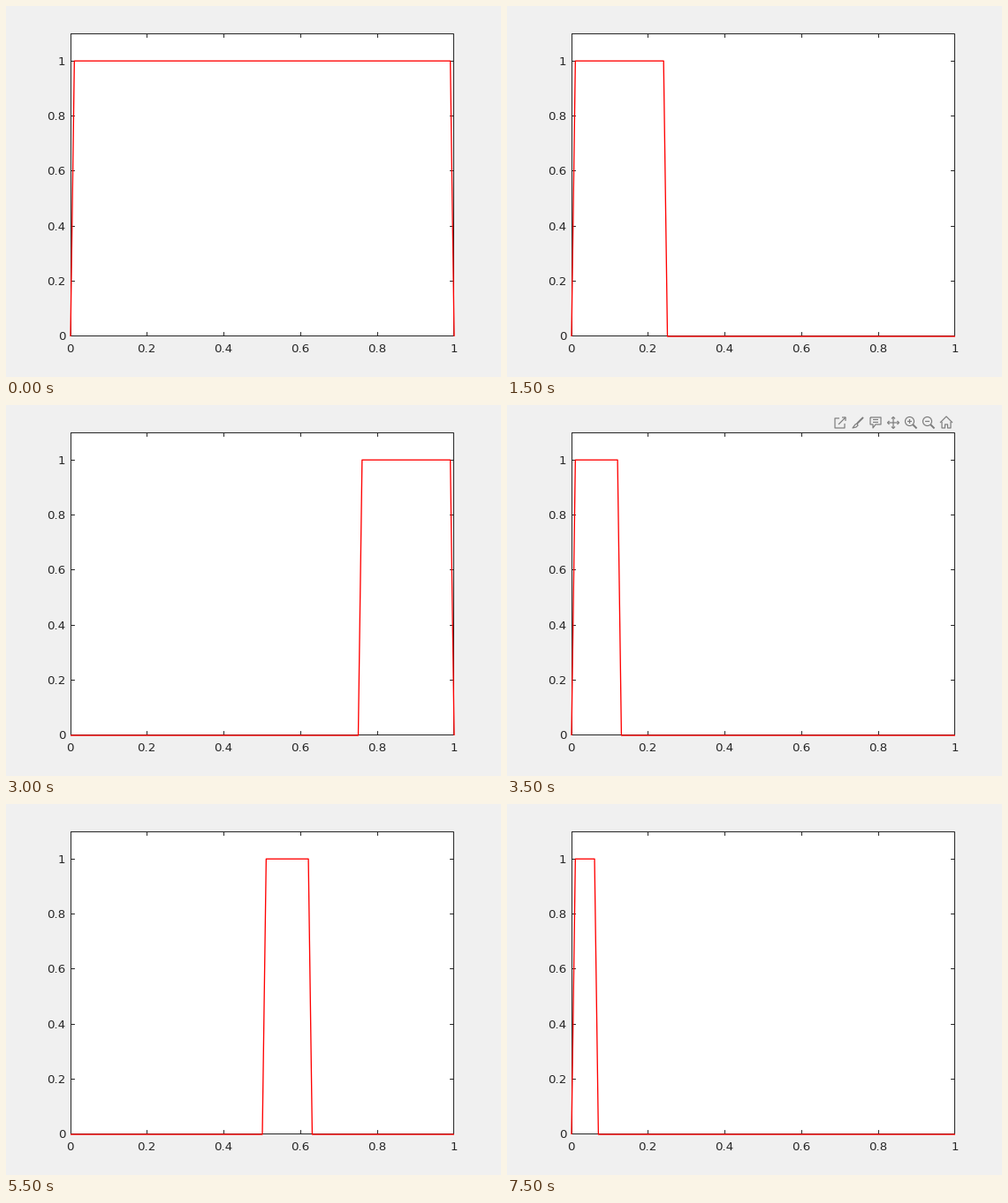
These frames come from a looping animation (560 px wide and 420 px high, 8000 ms). A matplotlib script:

```python
import numpy as np
import matplotlib.pyplot as plt
from matplotlib.animation import FuncAnimation
from matplotlib.patches import Circle, Rectangle

W, H, DPI = 560, 420, 100
PX = 72 / DPI  # points per pixel
LEFT, RIGHT, TOP, BOTTOM = 73, 507, 31, 374
Y_MAX = 1.1
INK, RED, ICON = "#262626", "#ff0000", "#7d7d7d"
TICK = 4.4

plt.rcParams["font.family"] = "DejaVu Sans"
fig = plt.figure(figsize=(W / DPI, H / DPI), dpi=DPI, facecolor="#f0f0f0")
ax = fig.add_axes([0, 0, 1, 1])
ax.set_xlim(0, W)
ax.set_ylim(H, 0)
ax.axis("off")


def px(x):
    return LEFT + x * (RIGHT - LEFT)


def py(y):
    return BOTTOM - y * (BOTTOM - TOP) / Y_MAX


def mid(p, edge):
    """Centre of the pixel that holds p, kept inside the plot box."""
    return min(np.floor(p + 1e-6), edge - 1) + 0.5


def stroke(xs, ys, color=INK, width=1.0, **kw):
    kw.setdefault("solid_capstyle", "butt")
    return ax.plot(xs, ys, color=color, lw=width * PX, snap=False, **kw)[0]


def label(x, y, text, align):
    ax.text(x, y, text, fontsize=13.33 * PX, color=INK, ha=align, va="baseline")


def draw_axes():
    ax.add_patch(Rectangle((LEFT, TOP), RIGHT - LEFT, BOTTOM - TOP,
                           fc="white", ec="none", snap=False, zorder=0))
    l, r, t, b = LEFT + 0.5, RIGHT - 0.5, TOP + 0.5, BOTTOM - 0.5
    stroke([l, r, r, l, l], [t, t, b, b, t], solid_joinstyle="miter",
           solid_capstyle="projecting")
    for v in np.arange(6) / 5:
        x, y = mid(px(v), RIGHT), mid(py(v), BOTTOM)
        name = f"{v:g}"
        label(px(v) - 0.5, 392, name, "center")
        label(67.5, y + 4.5, name, "right")
        if 0 < v < 1:
            stroke([x, x], [b, b - TICK])
            stroke([x, x], [t, t + TICK])
        if v > 0:
            stroke([l, l + TICK], [y, y])
            stroke([r, r - TICK], [y, y])


def draw_toolbar():
    """Small hover buttons above the plot, right to left."""
    cy, step = 20, 20
    home, out, into, pan, tip, brush, export = (497 - step * i for i in range(7))
    parts = []

    def line(cx, xs, ys, width=1.2):
        parts.append(stroke(cx + np.array(xs), cy + np.array(ys), ICON, width))

    def shape(patch):
        parts.append(ax.add_patch(patch))

    line(home, [-7, 0, 7], [0, -7, 0])
    line(home, [-5, -5, -1.5, -1.5, 1.5, 1.5, 5, 5], [-1, 6, 6, 2, 2, 6, 6, -1])
    for cx in (out, into):
        shape(Circle((cx - 1.5, cy - 1.5), 5, fc="none", ec=ICON, lw=1.2 * PX))
        line(cx, [2.2, 6.5], [2.2, 6.5], 2)
        line(cx, [-4, 1], [-1.5, -1.5])
    line(into, [-1.5, -1.5], [-4, 1])
    line(pan, [-6, 6], [0, 0])
    line(pan, [0, 0], [-6, 6])
    for s in (-1, 1):
        line(pan, [-2, 0, 2], [4.5 * s, 6.5 * s, 4.5 * s])
        line(pan, [4.5 * s, 6.5 * s, 4.5 * s], [-2, 0, 2])
    line(tip, [-6, 6, 6, 0, -3, -3, -6, -6], [-6, -6, 2, 2, 6, 2, 2, -6])
    line(tip, [-3, 3], [-3.5, -3.5])
    line(tip, [-3, 3], [-0.5, -0.5])
    line(brush, [6, -1], [-6, 1], 2)
    line(brush, [-1, -3, -6, -2, 0, -1], [1, 2, 6, 5, 3, 1])
    line(export, [-1, -6, -6, 5, 5], [-5, -5, 6, 6, 1])
    line(export, [-2, 6], [2, -6])
    line(export, [2, 6, 6], [-6, -6, -2])
    return parts


draw_axes()
toolbar = draw_toolbar()
grid = np.arange(101) / 100
curve = stroke([], [], RED, 1.33, solid_joinstyle="round", zorder=5)


def update(i):
    # Sliding indicator: interval k of 2**level equal parts of [0, 1].
    n = i + 1
    level = n.bit_length() - 1
    parts = 2 ** level
    k = n - parts
    inside = (grid > k / parts) & (grid < (k + 1) / parts)
    curve.set_data(px(grid), py(inside.astype(float)))
    for part in toolbar:
        part.set_visible(i in (7, 8))
    return [curve, *toolbar]


anim = FuncAnimation(fig, update, frames=16, interval=500, repeat=True,
                     repeat_delay=0, blit=False)
plt.show()
```
